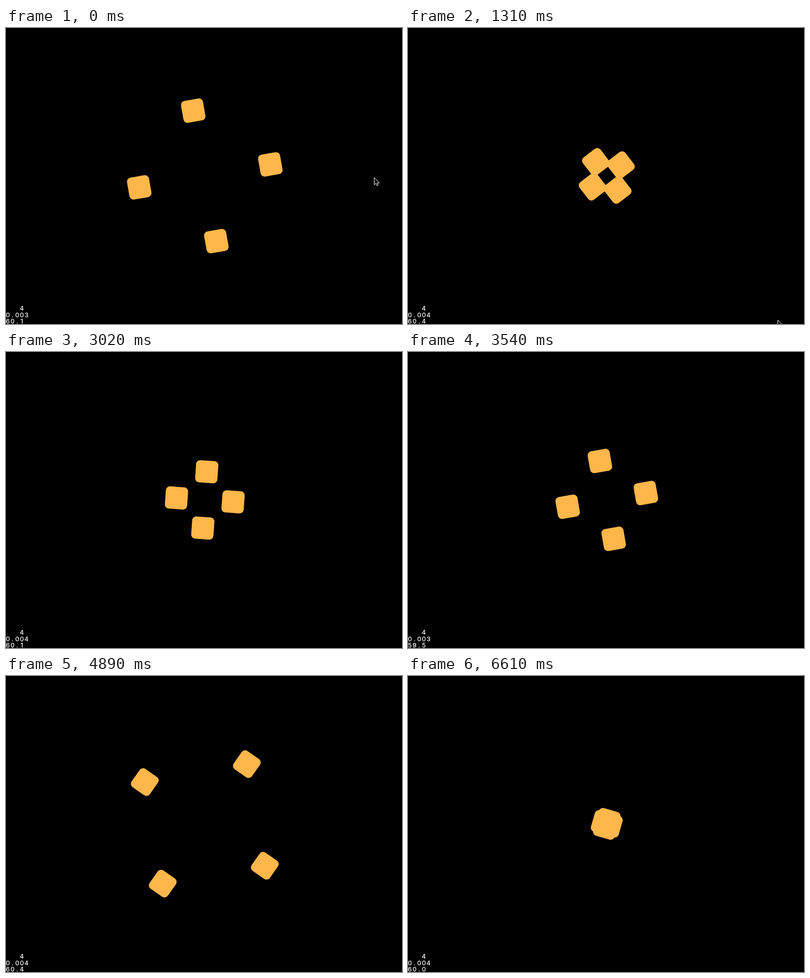
These frames come from a looping animation (763 px wide and 573 px high, 6.69 s). An HTML page with a canvas:

```html
<!DOCTYPE html>
<html>
<head>
<meta charset="utf-8">
<style>
html, body { margin: 0; width: 100%; height: 100%; overflow: hidden; background: #000; }
canvas { display: block; }
</style>
</head>
<body>
<canvas id="stage" width="763" height="573"></canvas>
<script>
const g = document.getElementById('stage').getContext('2d');
const LOOP = 6690, STEP = 59;

// Key poses: step number, rotation in degrees
const spin = [[0, 80], [22, 322.5], [42, 468], [60, 620], [82, 845], [96, 992.5], [112, 1096]];

// Frame rate, refreshed twice a second
const rates = [60.1, 59.7, 60.4, 60.1, 59.8, 60.2, 60.1, 59.5, 60.3, 60.4, 59.6, 60, 59.9, 60];

function angle(n) {
  const i = Math.max(1, spin.findIndex(k => k[0] >= n));
  const [n0, a0] = spin[i - 1], [n1, a1] = spin[i];
  return a0 + (a1 - a0) * (n - n0) / (n1 - n0);
}

// Grows over a turn and a half, then collapses in half a turn
function radius(deg) {
  const p = (deg + 360) % 720;
  return 1.7 + 155.3 * Math.min(p / 540, (720 - p) / 180);
}

function drawTiles(deg) {
  const r = radius(deg);
  g.save();
  g.translate(383, 286.3);
  g.rotate(deg * Math.PI / 180);
  g.fillStyle = '#ffb74b';
  for (let i = 0; i < 4; i++) {
    g.beginPath();
    g.roundRect(r - 21.5, -21.5, 43, 43, 8);
    g.fill();
    g.rotate(Math.PI / 2);
  }
  g.restore();
}

// The pointer swings out to the right and leaves through the bottom edge
function drawPointer(u) {
  const x = 709 + 3 * u + 45 * Math.sin(Math.PI * u), y = 289 + 276 * u;
  g.save();
  g.translate(Math.round(x) + 0.5, Math.round(y) + 0.5);
  g.fillStyle = '#000';
  g.strokeStyle = '#fff';
  const arrow = new Path2D('M0 0V14L3 11 5.5 16 7.5 15 5.5 10.5H10Z');
  g.fill(arrow);
  g.stroke(arrow);
  g.restore();
}

function drawStats(t) {
  const n = Math.floor(t / 500);
  const cost = n % 11 % 7 ? '0.004' : '0.003';
  g.fillStyle = '#fff';
  g.font = '500 12px Inter, "Liberation Sans", sans-serif';
  g.textAlign = 'center';
  ['   4', cost, rates[n].toFixed(1)].forEach((line, row) =>
    [...line].forEach((c, i) => g.fillText(c, 3.5 + 9 * i, 547 + 12.7 * row)));
}

function draw(now) {
  const n = Math.min(112, Math.floor((now % LOOP + 2) / STEP));
  g.fillStyle = '#000';
  g.fillRect(0, 0, 763, 573);
  drawTiles(angle(n));
  drawPointer(n / 22);
  drawStats(n * STEP);
}

const start = performance.now();
function tick() {
  draw(performance.now() - start);
  requestAnimationFrame(tick);
}
tick();
</script>
</body>
</html>
```
